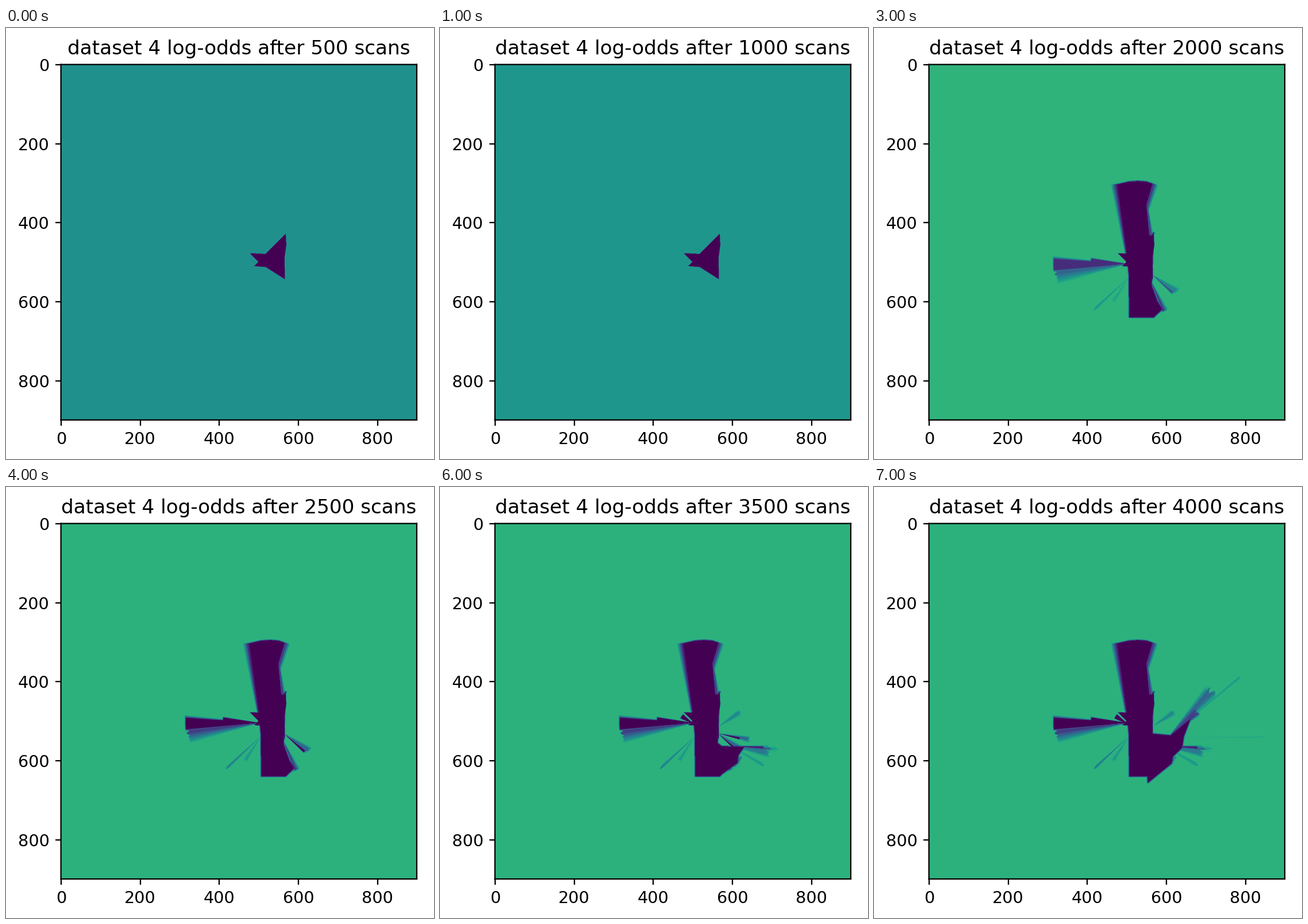
A matplotlib script for the animation above (8 s loop, 745 by 751 pixels).

```python
import numpy as np
import matplotlib.pyplot as plt
from matplotlib.animation import FuncAnimation
from matplotlib.path import Path

W, H, DPI = 745, 751, 100
LEFT, TOP, SIDE = 95.6, 63.6, 619.4
X0, X1, Y0, Y1 = 96, 715, 64, 683        # pixels of the map
STEPS, STEP_MS = 8, 1000

rng = np.random.default_rng(4)
cmap = plt.get_cmap("viridis")

# two samples per pixel in each direction
gx, gy = np.meshgrid(np.arange(X0, X1, 0.5) + 0.25, np.arange(Y0, Y1, 0.5) + 0.25)
points = np.column_stack([gx.ravel(), gy.ravel()])


def to_pixels(a):
    return a.reshape(Y1 - Y0, 2, X1 - X0, 2).mean(axis=(1, 3))


def soften(a):
    for axis in (0, 1):
        a = (np.roll(a, 1, axis) + 2 * a + np.roll(a, -1, axis)) / 4
    return a


def area(verts):
    """Fully scanned free space inside a polygon."""
    return to_pixels(Path(verts).contains_points(points).reshape(gx.shape))


def beam(apex, angle, half, reach, k=1.0, fade=None, rough=0.0):
    """Scan sector in degrees (clockwise from right) that fades at its sides.

    rough varies strength and reach from ray to ray.
    """
    fade = half if fade is None else fade
    dx, dy = gx - apex[0], gy - apex[1]
    off = (np.degrees(np.arctan2(dy, dx)) - angle + 180) % 360 - 180
    rays = np.linspace(-half, half, int(half * 2) + 3)
    dim = np.interp(off, rays, 1 - rough * rng.random(rays.size))
    far = reach * np.interp(off, rays, 1 - 0.25 * rough * rng.random(rays.size))
    side = np.clip((half - np.abs(off)) / fade, 0, 1)
    end = np.clip((far - np.hypot(dx, dy)) / 2 + 0.5, 0, 1)
    return to_pixels(k * dim * side * end)


def join(*layers):
    return np.maximum.reduce(layers)


# places the rays come from
HUB, DOOR, REAR, BEND, TURN = (442, 411), (483, 429), (444, 434), (505, 451), (512, 436)

# the star seen from the start, then with its wall corners slightly widened
star = area([(487, 358), (452, 393.5), (424, 392.3), (439, 407.5), (432, 415),
             (452, 416.5), (485.5, 438), (485, 400), (488, 378)])
widened = join(star,
               beam((452, 394), -46.5, 3, 52, 0.8, 2),
               beam((452, 416), 35, 3, 40, 0.8, 2))

hall = join(
    soften(area([(422, 272), (444, 267), (460, 266), (474, 267), (486, 271),
                 (475, 308), (480, 361), (487, 361), (484, 448), (494, 476),
                 (503, 490), (487, 505), (443.5, 505), (443, 432), (440, 400)])),
    beam((446, 440), -97, 4.5, 170, 0.85, 3),
    beam((443, 420), -73.5, 3, 155, 0.8),
    beam((475, 300), 84, 5, 62, 0.8),
    beam((482, 440), 67, 8, 58, 0.8))

arm = join(
    beam(HUB, 179.5, 5.8, 130, 1, 1.5),
    beam(HUB, 184, 6, 65, 1, 2),
    beam(HUB, 184.5, 1.5, 131, 0.6))
arm_tail = beam(HUB, 173, 9.5, 129, 0.85, 9, 0.2)

rear_beams = join(
    beam(REAR, 137, 2.5, 86, 0.45, rough=0.4),
    beam(REAR, 123, 5, 57, 0.35, rough=0.6))

door_beams = join(
    beam(DOOR, 41, 4, 49, 1, 2),
    beam(DOOR, 35, 9, 56, 0.65, 6, 0.5))

corridor = join(widened, hall, arm, arm_tail, rear_beams, door_beams)
early = join(widened, hall, 0.8 * arm, 0.7 * arm_tail, 0.6 * rear_beams,
             0.6 * door_beams)

tip = beam((443, 414), 213, 11, 27, 1, 3)
side_beams = join(
    beam(DOOR, 13, 4, 40, 1, 2),
    beam(DOOR, 11, 6, 59, 0.6, 4, 0.4),
    beam((484, 418), -34, 8, 49, 0.4, 5, 0.6),
    beam(BEND, 3, 4, 60, 0.95, 3, 0.2),
    beam(BEND, 8, 10, 73, 0.6, 6, 0.6),
    beam(BEND, 4, 4, 86, 0.2, rough=0.5),
    beam(BEND, 30, 4, 69, 0.3, rough=0.5))

corner = np.array([(470, 436), (491, 451), (531, 452), (520, 468), (519, 481),
                   (487, 504), (460, 500)])
inner = corner[0] + 0.88 * (corner - corner[0])
turned = join(corridor, tip, side_beams, soften(area(corner)),
              beam((480, 450), 38, 16, 52, 0.6, 8, 0.3))

upper_right = join(
    soften(area([(484, 429), (516, 432), (553, 401), (540, 435), (537, 455),
                 (521, 470), (519, 482), (476, 517), (475, 503), (460, 490)])),
    beam(TURN, -42, 8, 70, 0.9, 5, 0.3),
    beam(TURN, -47, 7, 115, 0.6, 5, 0.4),
    beam(TURN, -40, 1, 163, 0.2),
    beam(TURN, 0, 0.7, 168, 0.08))

# background level and scanned space of every step
SCENES = [
    (0.5, star),
    (0.525, star),
    (0.667, widened),
    (0.65, early),
    (0.643, corridor),
    (0.643, join(corridor, tip, 0.8 * side_beams, soften(area(inner)))),
    (0.643, turned),
    (0.643, join(turned, upper_right)),
]

fig = plt.figure(figsize=(W / DPI, H / DPI), dpi=DPI, facecolor="white")

# pixel-space layer under the plot frame
stage = fig.add_axes([0, 0, 1, 1])
stage.axis("off")
scan = stage.imshow(np.zeros((Y1 - Y0, X1 - X0, 4)), extent=(X0, X1, Y1, Y0),
                    interpolation="nearest", aspect="auto")
stage.set(xlim=(0, W), ylim=(H, 0))

ax = fig.add_axes([LEFT / W, 1 - (TOP + SIDE) / H, SIDE / W, SIDE / H])
ax.patch.set_visible(False)
ax.set(xlim=(-0.5, 899.5), ylim=(899.5, -0.5),
       xticks=range(0, 900, 200), yticks=range(0, 900, 200))
ax.tick_params(length=7.2, width=1.65, pad=7.2, labelsize=20.6,
               labelfontfamily="DejaVu Sans")
for spine in ax.spines.values():
    spine.set(linewidth=1.65, snap=False)
title = ax.set_title("", fontsize=24.7, pad=12.4, family="DejaVu Sans")


def draw(i):
    back, seen = SCENES[i]
    scan.set_data(cmap(back * (1 - seen)))
    title.set_text(f"dataset 4 log-odds after {500 * (i + 1)} scans")
    return scan, title


anim = FuncAnimation(fig, draw, frames=STEPS, interval=STEP_MS, repeat=True,
                     repeat_delay=0, blit=False)
plt.show()
```
